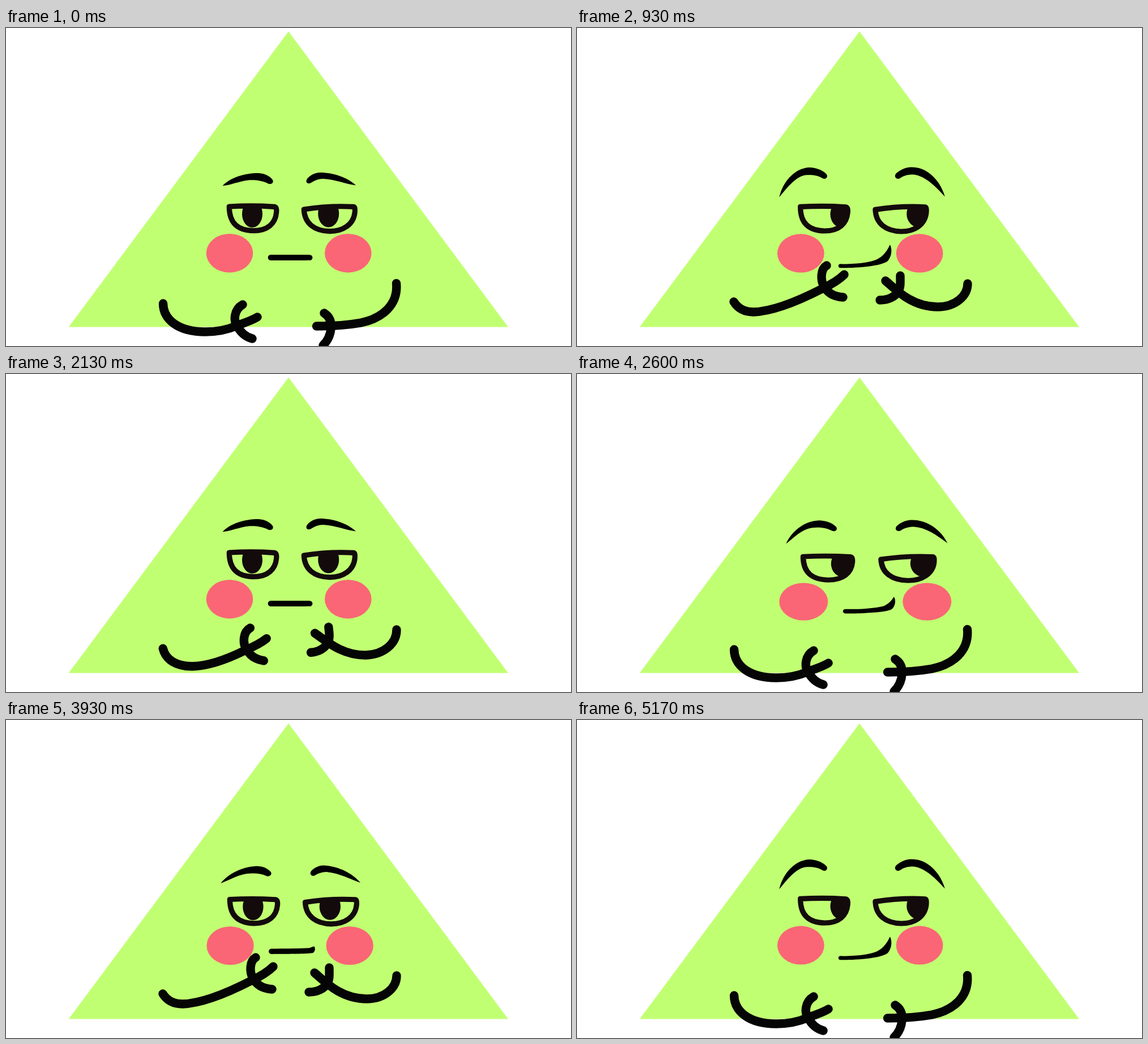
These frames come from a looping animation (998x561 px, 5.21 s). An HTML page:

```html
<!DOCTYPE html>
<html lang="en">
<head>
<meta charset="utf-8">
<title>Smirking triangle</title>
<style>
  html, body { margin: 0; width: 100%; height: 100%; overflow: hidden; background: #fff; }
  svg { display: block; width: 100%; height: 100%; }
  .eye { fill: none; stroke: #130a0c; stroke-width: 9.2; stroke-linejoin: round; }
  .pupil { fill: #130a0c; }
  .arm { fill: none; stroke: #050505; stroke-width: 15.4; stroke-linecap: round; stroke-linejoin: round; }
</style>
</head>
<body>
<svg viewBox="0 0 998 561">
  <defs>
    <path id="eyeL" d="M394.3,315 Q435,312.8 474,315.3 Q478.5,316 477.7,325 C476,345 462,357.7 437,357.7 C410,357 394.3,345 394.3,315Z"/>
    <path id="eyeR" d="M526.3,320 Q570,313 614,315.3 Q617,315.5 616.2,325 C614,347 595,358.7 572,358.7 C545,358 527.3,345 526.3,320Z"/>
    <clipPath id="clipL"><use href="#eyeL"/></clipPath>
    <clipPath id="clipR"><use href="#eyeR"/></clipPath>
  </defs>
  <path d="M499,6 L887,527.5 H110.7Z" fill="#c1ff72"/>
  <g id="face">
    <g fill="#fa6675">
      <ellipse cx="395" cy="397.2" rx="41.3" ry="34.2"/>
      <ellipse cx="604.3" cy="397.2" rx="41.3" ry="34.2"/>
    </g>
    <path id="browL"/>
    <path id="browR"/>
    <g clip-path="url(#clipL)"><ellipse id="pupilL" class="pupil" cy="328" ry="24"/></g>
    <g clip-path="url(#clipR)"><ellipse id="pupilR" class="pupil" cy="327.5" ry="24"/></g>
    <use href="#eyeL" class="eye"/>
    <use href="#eyeR" class="eye"/>
    <path id="mouth"/>
  </g>
  <path id="armL" class="arm"/>
  <path id="handL" class="arm"/>
  <path id="armR" class="arm"/>
  <path id="handR" class="arm"/>
</svg>
<script>
const LOOP = 5210, ARM_CYCLE = LOOP / 2, FACE_CYCLE = 2120;
const $ = id => document.getElementById(id);

// Each part: [neutral, smirking]
const faceParts = {
  browL: [
    'M382.5,278.5 C396,264 421,256 446,256 C458,256.5 467,262 471,268 C474,274 467,277 462,274 C450,268 432,267 419,270 C405,273 396,277 382.5,278.5Z',
    'M357,298 C362,275 381,247 410,245.5 C424,246 434,251 440,257 C444,262 439,268 433,264.5 C424,259 414,258 403,259 C386,262 373,279 357,298Z'],
  browR: [
    'M618,277.5 C604,264 578,255 555,255 C545,255 537,260 532,266 C528,272 533,276 538,273.5 C545,269 552,266 560,266 C582,267 602,276 618,277.5Z',
    'M649,297 C641,270 620,245 590,245 C578,245 569,251 563,256 C558,262 564,268 570,264.5 C576,260 584,258 592,258 C611,259 629,275 649,297Z'],
  mouth: [
    'M468,400 C490,400 515,400 534,400 C536,400 538,400 540,401.5 C542,404 542,407 539,409.5 C537,410.3 490,410 468,410 C461,410 461,400 468,400Z',
    'M465,416 C490,417 515,414 529,408 C540,403 548,392 552,382 C556,388 556,402 548,411 C535,421 490,423 465,423 C460,423 460,416 465,416Z']
};
// Each part: [raised, lowered]
const leftParts = {
  armL: [
    'M277,483 C285,496 297,501 312,501 C345,500 390,482 433,460 C450,452 462,445 472,435',
    'M277.5,486 C278,515 305,536 352,536 C372,536 392,532 408,525 C422,520 434,516 444,510'],
  handL: [
    'M441,419 C430,425 430,445 436,455 C443,469 455,474 470,475',
    'M418,488 C402,497 402,517 408,525 C414,537 424,545 435,548']
};
const rightParts = {
  armR: [
    'M545,446 C562,460 590,492 637,492 C668,492 690,473 690,451',
    'M548.5,526 C575,526 605,524 627,520 C665,512 693,488 689.5,450.5'],
  handR: [
    'M571,437 C571,450 572,458 567,465 C562,474 550,480 535,480',
    'M562,503 C573,510 575,520 574,530 C573,542 568,552 560,560']
};

const mix = (a, b, k) => a + (b - a) * k;
const ramp = (t, from, to) => Math.min(1, Math.max(0, (t - from) / (to - from)));
const smooth = u => u * u * (3 - 2 * u);
const ease = (t, from, to) => smooth(ramp(t, from, to));

function morph(parts, k) {
  for (const [id, [from, to]] of Object.entries(parts)) {
    const ends = to.match(/[\d.]+/g);
    let i = 0;
    $(id).setAttribute('d', from.replace(/[\d.]+/g, n => mix(+n, +ends[i++], k).toFixed(2)));
  }
}

function pupil(id, k, x, rx) {
  $(id).setAttribute('cx', mix(x[0], x[1], k));
  $(id).setAttribute('rx', mix(rx[0], rx[1], k));
}

function bend(id, x, slope) {
  $(id).setAttribute('transform', `matrix(1 ${slope} 0 1 0 ${-slope * x})`);
}

function drawFace(t) {
  const smirk = ease(t, 200, 655) - ease(t, 1400, 1950);
  const squash = 0.042 * (ease(t, 70, 470) - ease(t, 470, 1010))
    + 0.017 * Math.sin(Math.PI * ramp(t, 1400, 1950)) ** 2;
  const sx = 1 + squash, sy = 1 - 0.79 * squash;
  $('face').setAttribute('transform',
    `translate(270 530) scale(${sx} ${sy}) translate(-270 -530)`);
  morph(faceParts, smirk);

  // The outer ends of the brows relax later than the rest.
  const lag = 0.24 * (ease(t, 1400, 1950) - ease(t, 1400, 2110));
  bend('browL', 467, -lag);
  bend('browR', 535, lag);

  const look = ease(smirk, 0.2, 0.85);
  pupil('pupilL', look, [435, 467], [18, 20]);
  pupil('pupilR', look, [569.7, 603], [18.5, 21.5]);
}

function drawArms(t) {
  const rise = ease(t, 440, 835);
  morph(leftParts, 1 - rise + ease(t, 1800, 2540));
  morph(rightParts, 1 - rise + ramp(t, 1680, 2546) ** 3);
}

function frame(now) {
  const t = now % LOOP;
  drawFace(t % FACE_CYCLE);
  drawArms(t % ARM_CYCLE);
}

const start = performance.now();
function tick() {
  frame(performance.now() - start);
  requestAnimationFrame(tick);
}
tick();
</script>
</body>
</html>
```
